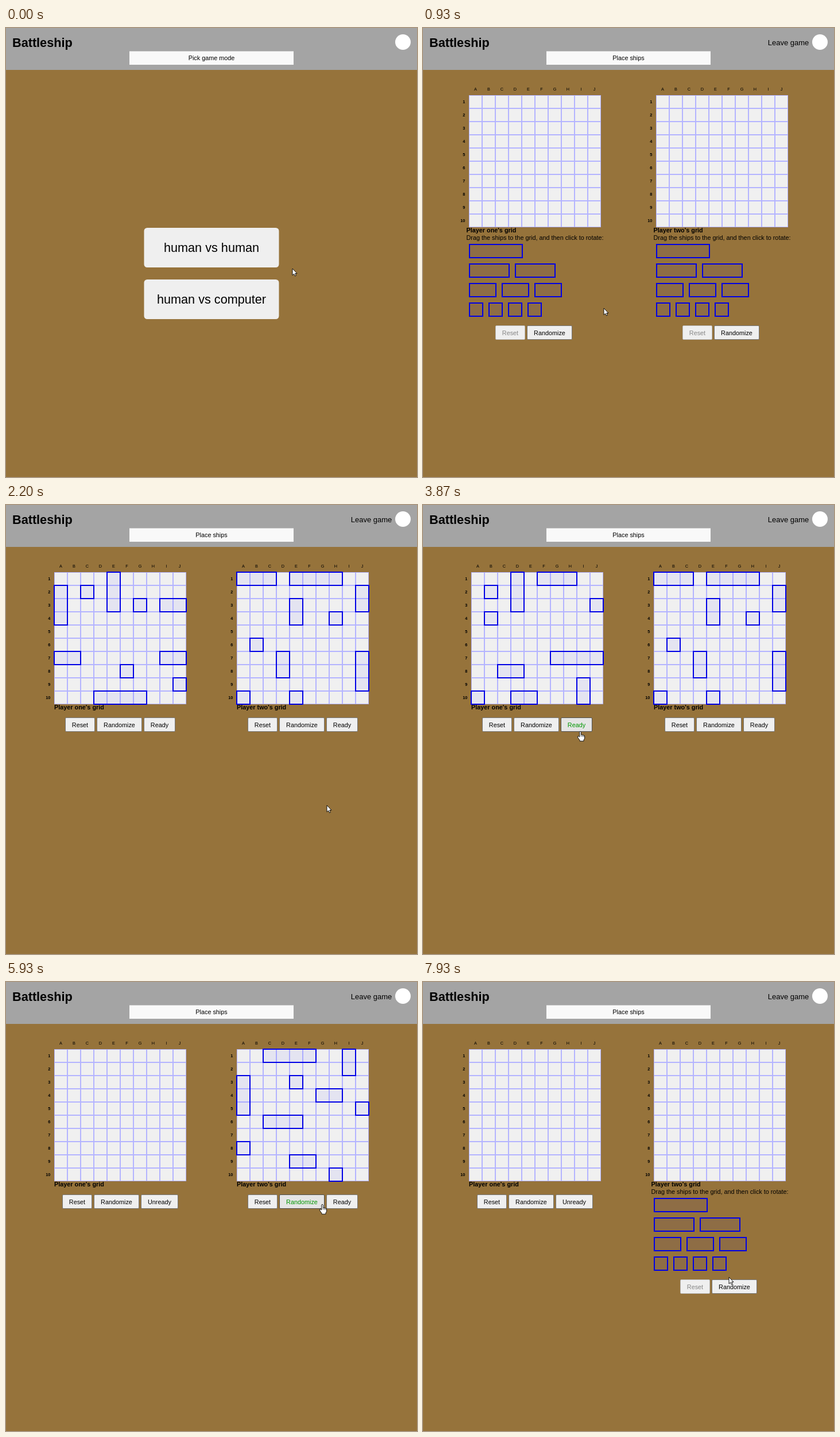
These frames come from a looping animation (716x782 px, 8 s). An HTML page:

```html
<!DOCTYPE html>
<html lang="en">
<head>
<meta charset="utf-8">
<title>Battleship</title>
<style>
  html, body { margin: 0; width: 100%; height: 100%; overflow: hidden; background: #96733b; }
  svg { display: block; width: 716px; height: 782px; font-family: "Liberation Sans", Arial, sans-serif; }
  text { white-space: pre; }
</style>
</head>
<body>
<svg id="stage" viewBox="0 0 716 782"></svg>
<script>
const LOOP = 8000, FPS = 15;
const CELL = 23, SIDE = CELL * 10, TOP = 117;
const BASE = 10.83; // body font size
const BUTTON_WIDTH = { Reset: 52, Randomize: 79, Ready: 55, Unready: 65 };
const SHIP_STYLE = 'fill="#00f" fill-opacity=".05" stroke="#0000e6" stroke-width="2"';

const FLEETS = {
  one: 'E1v3 A2v3 C2 G3 I3h2 A7h2 I7h2 F8 J9 D10h4',
  two: 'D1v3 F1h3 B2 J3 B4 G7h4 C8h2 I9v2 A10 D10h2',
  three: 'A1h3 E1h4 J2v2 E3v2 H4 B6 D7v2 J7v3 A10 E10',
  four: 'C1h4 I1v2 A3v3 E3 G4h2 J5 C6h3 A8 E9h2 H10',
  five: 'A1h2 D1 G1v3 J2v2 B4h4 I5 F6v3 B7 I8v2 D10',
  six: 'J1 D2 B3v3 D4h2 H5h2 E7 G8h2 B8v3 D10h4 I10',
  seven: 'B1v2 E2h3 J1 H4h2 A5 D5v4 G7 I7v3 A9h2 F10'
};

// [tick, player one, player two]; 'dock' = not placed, 'ready' = placed and hidden
const STATES = [
  [9, 'dock', 'dock'], [26, 'one', 'dock'], [32, 'one', 'three'], [47, 'two', 'three'],
  [60, 'ready', 'three'], [80, 'ready', 'four'], [95, 'ready', 'five'],
  [98, 'ready', 'six'], [102, 'ready', 'seven'], [108, 'ready', 'dock']
];
const PRESSES = [8, 25, 31, 46, 59, 79, 94, 97, 101, 107];

// [tick, x, y] of the pointer
const PATH = [
  [1, 499, 419], [6, 405, 395], [9, 392, 394], [14, 315, 488], [18, 262, 520],
  [23, 226, 532], [26, 224, 532], [28, 262, 531], [31, 540, 529], [32, 546, 528],
  [33, 559, 523], [38, 235, 463], [40, 235, 463], [44, 205, 386], [52, 205, 386],
  [57, 274, 394], [60, 274, 394], [65, 467, 422], [72, 505, 384], [76, 521, 387],
  [78, 523, 391], [84, 523, 391], [88, 555, 388], [92, 538, 383], [103, 538, 383],
  [106, 450, 384], [108, 450, 384], [111, 463, 437], [113, 463, 437], [119, 533, 514]
];

const ARROW = 'M0 0V11.6L2.7 9.2L4.5 13L6.4 12.1L4.7 8.5H8Z';
const HAND = 'M-1.3 10V1.2Q0-1 1.3 1.2V6.2Q2.8 5 3.8 6.8Q5.4 5.8 6 7.4Q7.6 7 7.6 8.8V12' +
  'Q7.2 14 6 15V17.2H-1V15.6Q-3.4 12.6-4.6 10.2Q-4.8 8-2.8 8.8Z';

const rect = (x, y, w, h, attrs) =>
  `<rect x="${x}" y="${y}" width="${w}" height="${h}" ${attrs}/>`;
const text = (str, x, y, size = BASE, attrs = '') =>
  `<text x="${x}" y="${y}" font-size="${size}" ${attrs}>${str}</text>`;
const MIDDLE = 'text-anchor="middle"', END = 'text-anchor="end"', BOLD = 'font-weight="bold"';

function pointerAt(tick) {
  const next = PATH.findIndex(p => p[0] > tick);
  if (next === 0) return PATH[0].slice(1);
  if (next < 0) return PATH[PATH.length - 1].slice(1);
  const [t0, x0, y0] = PATH[next - 1], [t1, x1, y1] = PATH[next];
  const k = (tick - t0) / (t1 - t0);
  return [Math.round(x0 + (x1 - x0) * k), Math.round(y0 + (y1 - y0) * k)];
}

// Two blocks centred side by side; a block with its dock is wider than its grid
function gridLefts(one, two) {
  const wide = s => s === 'dock' ? 239 : SIDE;
  const gap = 87.5, w1 = wide(one), w2 = wide(two);
  const left = (716 - w1 - gap - w2) / 2;
  return [left + (w1 - SIDE) / 2, left + w1 + gap + (w2 - SIDE) / 2].map(Math.round);
}

function buttonRow(x, state) {
  const docked = state === 'dock';
  const labels = ['Reset', 'Randomize'];
  if (!docked) labels.push(state === 'ready' ? 'Unready' : 'Ready');
  const total = labels.reduce((sum, l) => sum + BUTTON_WIDTH[l] + 3, -3);
  let left = x + SIDE / 2 - total / 2 - (docked ? 2 : 0);
  return labels.map(label => {
    const button = {
      label, x: left, y: docked ? 518 : 370, w: BUTTON_WIDTH[label], h: 25,
      off: docked && label === 'Reset'
    };
    left += button.w + 3;
    return button;
  });
}

function drawButton(b, hover, pressed) {
  const fill = pressed ? '#f5f5f5' : hover ? '#e5e5e5' : '#efefef';
  const ink = b.off ? '#858585' : hover ? '#009600' : '#000';
  if (b.big) {
    return rect(b.x, b.y, b.w, b.h, `rx="5.5" fill="${fill}"`) +
      text(b.label, 358, b.y + 41.5, BASE * 2, `${MIDDLE} fill="${ink}"`);
  }
  const edge = b.off ? '#bbb' : pressed ? '#8d8d8d' : hover ? '#4f4f4f' : '#767676';
  return rect(b.x + .5, b.y + .5, b.w - 1, b.h - 1, `rx="1.5" fill="${fill}" stroke="${edge}"`) +
    text(b.label, b.x + b.w / 2, b.y + 16.6, BASE, `${MIDDLE} fill="${ink}"`);
}

function drawGrid(x) {
  let out = rect(x + .5, TOP + .5, SIDE - 1, SIDE - 1, 'fill="#f0f0f0" stroke="#b4b4ff"');
  let lines = '';
  for (let i = 0; i < 10; i++) {
    const at = i * CELL;
    if (i) lines += `M${x + at} ${TOP}v${SIDE}M${x} ${TOP + at}h${SIDE}`;
    out += text('ABCDEFGHIJ'[i], x + at + 11.5, 109, 7.3, MIDDLE);
    out += text(i + 1, x - 6.7, TOP + at + 14.3, 7.3, `${END} ${BOLD}`);
  }
  return out + `<path d="${lines}" stroke="#b4b4ff" stroke-width="2"/>`;
}

function drawFleet(x, fleet) {
  return fleet.split(' ').map(code => {
    const [, col, row, dir, size] = code.match(/([A-J])(\d+)([hv]?)(\d?)/);
    const len = CELL * (size || 1);
    return rect(x + 'ABCDEFGHIJ'.indexOf(col) * CELL, TOP + (row - 1) * CELL,
      dir === 'h' ? len : CELL, dir === 'v' ? len : CELL, SHIP_STYLE);
  }).join('');
}

function drawDock(x) {
  let out = text('Drag the ships to the grid, and then click to rotate:', x - 4.5, 368.7);
  for (let row = 0; row < 4; row++) {
    const len = CELL * (4 - row);
    for (let i = 0; i <= row; i++) {
      out += rect(x + 1 + i * (len + 11), 377 + row * 34, len, CELL, SHIP_STYLE);
    }
  }
  return out;
}

function drawPlayer(x, name, state) {
  const docked = state === 'dock';
  return drawGrid(x) +
    text(`Player ${name}'s grid`, docked ? x - 4.5 : x, 356.3, BASE, BOLD) +
    (docked ? drawDock(x) : '') +
    (FLEETS[state] ? drawFleet(x, FLEETS[state]) : '');
}

function drawHeader(status, inGame) {
  return rect(0, 0, 716, 73, 'fill="#a4a4a4"') +
    text('Battleship', 11, 33.4, BASE * 2, BOLD) +
    rect(215, 40.5, 286, 23.5, 'fill="#f9f9f9"') +
    text(status, 358, 55.7, BASE, MIDDLE) +
    (inGame ? text('Leave game', 672.3, 30, BASE * 1.2, END) : '') +
    '<circle cx="691.5" cy="24.5" r="13.5" fill="#fff"/>';
}

function render(tick) {
  const state = STATES.filter(s => s[0] <= tick).pop();
  const [px, py] = pointerAt(tick);
  let out = rect(0, 0, 716, 782, 'fill="#96733b"');
  let buttons;
  if (state) {
    const [, one, two] = state;
    const [x1, x2] = gridLefts(one, two);
    out += drawHeader('Place ships', true) + drawPlayer(x1, 'one', one) + drawPlayer(x2, 'two', two);
    buttons = [...buttonRow(x1, one), ...buttonRow(x2, two)];
  } else {
    out += drawHeader('Pick game mode', false);
    buttons = ['human', 'computer'].map((rival, i) => ({
      label: `human vs ${rival}`, x: 240.5, y: 348 + i * 90, w: 235, h: 69, big: true
    }));
  }
  const hot = buttons.find(b => !b.off &&
    px >= b.x && px < b.x + b.w && py >= b.y && py < b.y + b.h);
  for (const b of buttons) out += drawButton(b, b === hot, b === hot && PRESSES.includes(tick));
  out += `<path d="${hot ? HAND : ARROW}" transform="translate(${px} ${py})" ` +
    'fill="#fff" stroke="#000" stroke-width=".9" stroke-linejoin="round"/>';
  if (hot) {
    out += `<path d="M1.3 6v3.5M3.8 6.8v3M6 7.4v2.6" transform="translate(${px} ${py})" ` +
      'fill="none" stroke="#000" stroke-width=".7"/>';
  }
  document.getElementById('stage').innerHTML = out;
}

const start = performance.now();
let shown = -1;
function frame() {
  const t = (performance.now() - start) % LOOP;
  const tick = Math.min(119, Math.floor((t + 4) * FPS / 1000));
  if (tick !== shown) render(shown = tick);
  requestAnimationFrame(frame);
}
frame();
</script>
</body>
</html>
```
